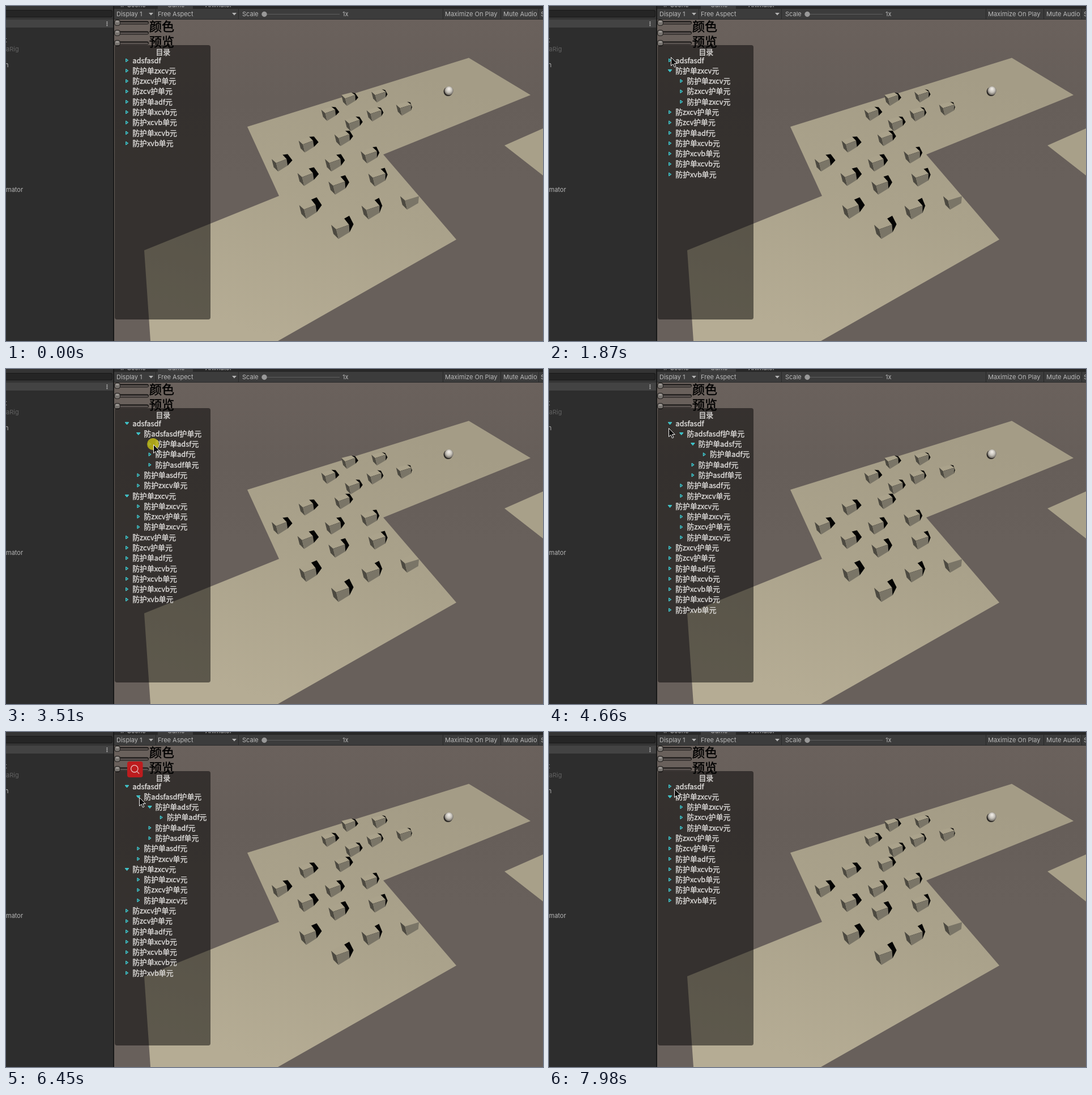
An HTML page with a canvas for the animation above (8000 ms loop, 948 by 591 pixels).

```html
<!DOCTYPE html>
<html lang="zh">
<head>
<meta charset="utf-8">
<style>
html, body { margin: 0; width: 100%; height: 100%; overflow: hidden; background: #2d2d2d; }
canvas { display: block; width: 948px; height: 591px; }
</style>
</head>
<body>
<canvas id="stage" width="948" height="591"></canvas>
<script>
const LOOP = 8000;
const stage = document.getElementById('stage');
const ui = '11px Inter, Roboto, sans-serif';
const cjk = '"Noto Sans CJK SC", "Noto Sans CJK", "Noto Sans", sans-serif';
let g;

const mix = (a, b, k) => a + (b - a) * k;
const ease = k => k < 0.5 ? 4 * k ** 3 : 1 - 4 * (1 - k) ** 3;

function poly(points, fill) {
  g.beginPath();
  points.forEach(([x, y]) => g.lineTo(x, y));
  g.closePath();
  g.fillStyle = fill;
  g.fill();
}

function stroke(color, width = 1) {
  g.strokeStyle = color;
  g.lineWidth = width;
  g.stroke();
}

function rect(x, y, w, h, fill) {
  g.fillStyle = fill;
  g.fillRect(x, y, w, h);
}

function round(x, y, w, h, r, fill) {
  g.beginPath();
  g.roundRect(x, y, w, h, r);
  g.fillStyle = fill;
  g.fill();
}

function disc(x, y, r, fill) {
  g.beginPath();
  g.arc(x, y, r, 0, 7);
  g.fillStyle = fill;
  g.fill();
}

// A weight above 0 thickens the strokes a little
function label(text, x, y, fill, font = ui, weight = 0) {
  g.font = font;
  g.fillStyle = fill;
  g.fillText(text, x, y);
  if (!weight) return;
  g.strokeStyle = fill;
  g.lineWidth = weight;
  g.strokeText(text, x, y);
}

function fade(paint, ...colors) {
  colors.forEach((c, i) => paint.addColorStop(i / (colors.length - 1), c));
  return paint;
}

// ---- 3D view ----
const cubes = [
  [658, 158], [605, 164], [702, 181], [570, 190], [650, 191], [612, 208],
  [594, 234], [531, 245], [641, 264], [484, 278], [578, 278], [530, 303],
  [655, 304], [585, 318], [712, 344], [534, 360], [644, 361], [591, 395]
];

// Size and tilt follow the depth, the visible shadow grows to the left
function cube(cx, cy) {
  const near = (cy - 160) / 235;
  const lean = Math.min(1, (640 - cx) / 110);
  const s = mix(0.76, 1, near);
  const at = (...pts) => pts.map(([x, y]) => [cx + x * s, cy + y * s]);
  const a = [-17, -9], d = [-8, -1], low = [-4, 16];
  const b = [7 - 2 * lean, mix(-15, -20, near)];
  const c = [16 - 3 * lean, -9], right = [16 - lean, 4];
  if (cx < 705) {
    g.filter = 'blur(0.7px)';
    poly(at(b, [15, mix(-13, -25, near)], [21 + 3.5 * lean, mix(-3, -10, near)], right, d), '#040403');
    g.filter = 'none';
  }
  poly(at(a, b, c, d), '#aaa28b');
  poly(at(a, d, low, [-13, 7]), '#4d4a41');
  poly(at(d, c, right, low), '#7a7567');
}

function drawView() {
  rect(191, 24, 757, 567, fade(g.createLinearGradient(0, 24, 0, 591),
    '#6a615c', '#665e59', '#68605b', '#68605b', '#68605b'));
  const ground = fade(g.createLinearGradient(640, 90, 480, 591), '#a49c86', '#aaa28b', '#b5ac94');
  poly([[426, 213], [817, 91.5], [926, 157], [666, 262], [795, 412], [480, 591],
        [255, 591], [244, 431], [482, 335]], ground);
  poly([[880, 246], [948, 216], [948, 299]], '#a8a089');
  cubes.forEach(([x, y]) => cube(x, y));
  disc(780.5, 151, 8, '#2b2825');
  disc(782, 149.5, 7.8, fade(g.createRadialGradient(782, 146, 1, 782, 149, 9),
    '#eeeae4', '#c4c0b8', '#5f5a53'));
}

// ---- editor frame ----
const dropArrow = x => poly([[x - 4, 12], [x + 4, 12], [x, 16.5]], '#b4b4b4');

function drawEditor() {
  rect(0, 0, 191, 591, '#2d2d2d');
  rect(0, 0, 190, 24, '#343434');
  round(-6, 7, 194, 13, 3, '#191919');
  round(-6, 8, 193, 11, 3, '#252525');
  rect(0, 24, 189, 14, '#434343');
  [28, 31, 34].forEach(y => rect(177.5, y - 0.5, 1.8, 1.8, '#c4c4c4'));
  label('t', -2, 64, '#b4b4b4');
  label('aRig', 0, 80, '#626262');
  label('n', -2, 108, '#b4b4b4');
  label('mator', 0, 328, '#b4b4b4');
  rect(189, 0, 2, 591, '#191919');

  rect(191, 0, 757, 5, '#282828');
  rect(268, 0, 62, 5, '#3c3c3c');
  [['#', 202], ['Scene', 214], ['Game', 285], ['Animator', 352]]
    .forEach(([text, x]) => label(text, x, 1.5, '#b8b8b8'));
  rect(191, 5, 757, 19, '#3c3c3c');
  rect(191, 23, 757, 1, '#2a2a2a');
  [264, 410, 771, 873, 940].forEach(x => rect(x, 5, 1, 18, '#282828'));
  [['Display 1', 195], ['Free Aspect', 268], ['Scale', 417], ['1x', 594],
   ['Maximize On Play', 775], ['Mute Audio', 878], ['Stats', 944]]
    .forEach(([text, x]) => label(text, x, 18, '#bababa'));
  dropArrow(256);
  dropArrow(403);
  rect(457, 14, 132, 1, '#5e5e5e');
  disc(456, 14.5, 4.7, '#999999');
}

function drawOverlay() {
  for (let y = 29.5; y < 70; y += 18) {
    round(192, y - 3, 60, 6, 3, '#171514');
    round(193, y - 1, 58, 3, 1.5, '#5c5552');
    round(191, y - 5.5, 11, 11, 4.5, '#242220');
    round(192, y - 4.5, 9, 9, 4, '#77736f');
    rect(194, y - 3, 5, 2, '#aaa6a2');
  }
  label('颜色', 253, 44.3, '#000', '22px ' + cjk, 0.5);
  label('预览', 253, 70.6, '#000', '22px ' + cjk, 0.5);
  round(192, 69, 169, 484, 4, 'rgba(0,0,0,0.49)');
  rowText('目录', 264.5, 81.5);
}

// ---- tree ----
const leaf = name => ({ name });
const open = (name, spans, ...kids) => ({ name, spans, kids });

const tree = [
  open('adsfasdf', [[2180, 5300], [5600, 7450]],
    open('防adsfasdf护单元', [[2960, 6530]],
      open('防护单adsf元', [[3590, 6530]], leaf('防护单adf元')),
      leaf('防护单adf元'),
      leaf('防护asdf单元')),
    leaf('防护单asdf元'),
    leaf('防护zxcv单元')),
  open('防护单zxcv元', [[1420, LOOP]],
    leaf('防护单zxcv元'), leaf('防zxcv护单元'), leaf('防护单zxcv元')),
  ...['防zxcv护单元', '防zcv护单元', '防护单adf元', '防护单xcvb元',
      '防护xcvb单元', '防护单xcvb元', '防护xvb单元'].map(leaf)
];

const within = (t, spans) => spans.some(([from, to]) => t >= from && t < to);

function rowText(text, x, y) {
  label(text, x, y + 4.7, '#dbd9d7', '12.8px ' + cjk, 0.4);
}

function arrow(x, y, down) {
  poly(down
    ? [[x - 3.2, y - 1.7], [x + 3.2, y - 1.7], [x, y + 2.2]]
    : [[x - 1.8, y - 2.8], [x + 2.2, y], [x - 1.8, y + 2.8]], down ? '#2bb5bc' : '#1d7075');
  stroke('#50e2e8');
}

function drawTree(t) {
  let row = 0;
  const walk = (nodes, depth) => nodes.forEach(n => {
    const y = 95.8 + 18.29 * row++;
    const shown = !!n.kids && within(t, n.spans);
    arrow(213.5 + depth * 20.2, y, shown);
    rowText(n.name, 223.3 + depth * 20.2, y);
    if (shown) walk(n.kids, depth + 1);
  });
  walk(tree, 0);
}

// ---- pointer ----
const entry = { at: 70, x: 824, y: 547 };
const move = (from, to, x, y) => ({ from, to, x, y });
const moves = [
  move(70, 300, 596, 348), move(380, 1170, 222, 114), move(1420, 1950, 215, 90),
  move(2180, 2500, 242, 125), move(2580, 2730, 236, 112), move(3040, 3440, 260, 133),
  move(3670, 4200, 254, 339), move(4200, 4750, 210, 100), move(4910, 5130, 212, 92),
  move(5770, 6450, 235, 115), move(6690, 6990, 198, 91), move(7070, 7300, 211, 92),
  move(7610, 7980, 221, 100)
];
const presses = [[1340, 1420], [2100, 2180], [2880, 2960], [3440, 3590],
                 [5130, 5300], [5370, 5600], [7370, 7450]];

function pointerAt(t) {
  let { x, y } = entry;
  for (const m of moves) {
    if (t < m.from) break;
    const k = ease(Math.min(1, (t - m.from) / (m.to - m.from)));
    x = mix(x, m.x, k);
    y = mix(y, m.y, k);
  }
  return [Math.round(x), Math.round(y)];
}

function drawPointer(t) {
  if (t < entry.at) return;
  const [x, y] = pointerAt(t);
  if (within(t, presses)) disc(x - 0.5, y - 0.5, 10.5, 'rgba(190,182,20,0.85)');
  const shape = [[0, 0], [0, 15], [3.5, 11.8], [6, 17.4], [8.5, 16.3], [6, 11], [10.8, 11]];
  poly(shape.map(([dx, dy]) => [x + 0.5 + dx, y + 0.5 + dy]), '#0c0b0a');
  stroke('#f4f4f4');
}

function drawSearch(t) {
  if (t < 5680 || t >= 6530) return;
  round(214, 52, 27.5, 28, 4, '#bd1c1e');
  g.beginPath();
  g.arc(226.8, 64.8, 6.2, 0, 7);
  g.moveTo(231.2, 69.4);
  g.lineTo(235.2, 73.6);
  stroke('#e6c4c3', 1.3);
}

// ---- run ----
const still = document.createElement('canvas');
still.width = stage.width;
still.height = stage.height;
g = still.getContext('2d');
drawView();
drawEditor();
drawOverlay();
g = stage.getContext('2d');

const start = performance.now();
function frame() {
  const t = (performance.now() - start) % LOOP;
  g.drawImage(still, 0, 0);
  drawTree(t);
  drawSearch(t);
  drawPointer(t);
  requestAnimationFrame(frame);
}
frame();
</script>
</body>
</html>
```
